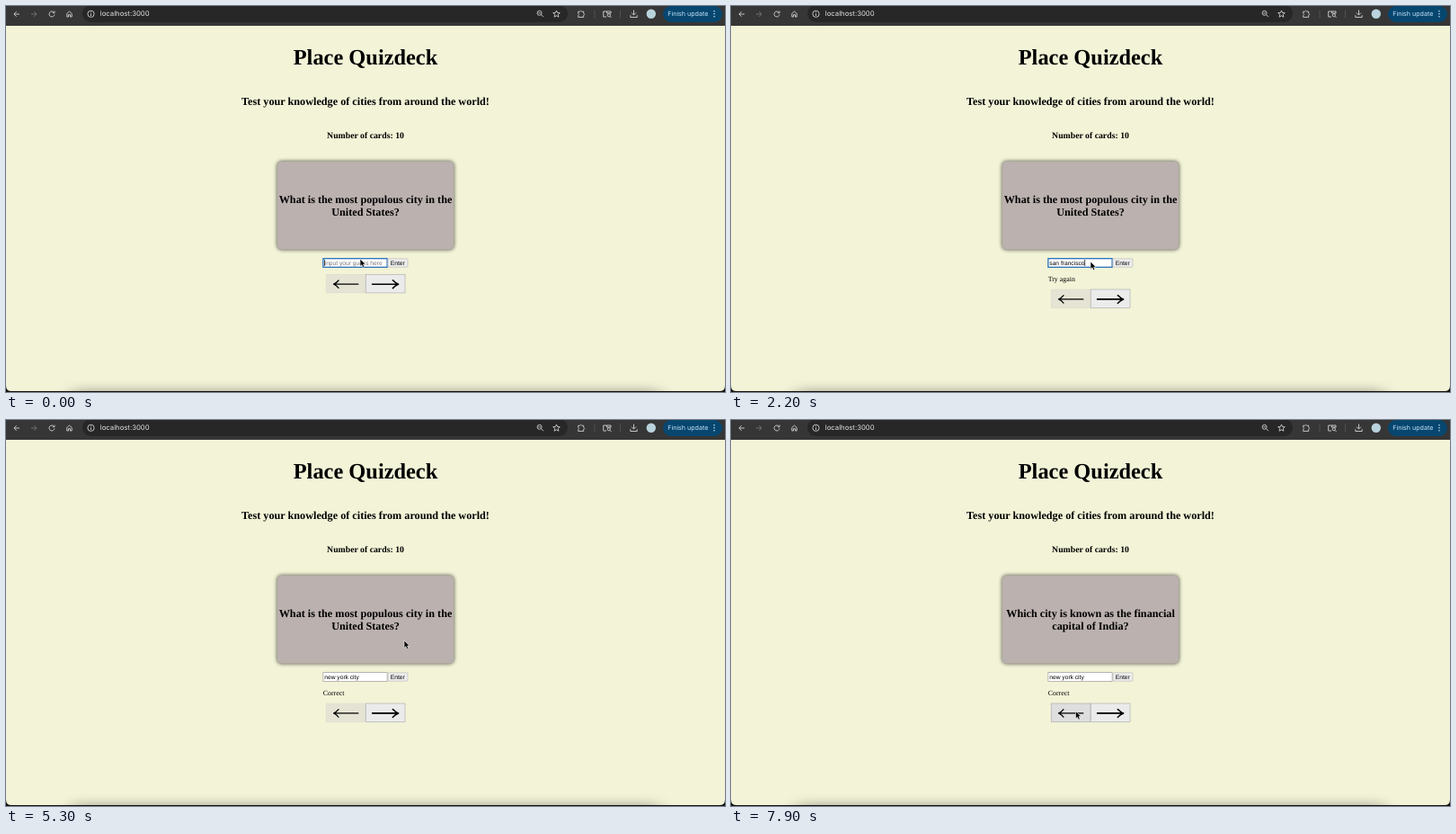
An HTML page that plays this animation: 800 px wide and 429 px high, repeating every 8000 ms.

```html
<!DOCTYPE html>
<html lang="en">
<head>
<meta charset="utf-8">
<title>Quiz</title>
<style>
  html, body { margin: 0; width: 100%; height: 100%; overflow: hidden; background: #111; }
  svg { display: block; width: 800px; height: 429px; }
  text { white-space: pre; text-rendering: geometricPrecision; }
  .ui { font-family: Inter, Roboto, sans-serif; }
  .serif { font-family: "Liberation Serif", Times, serif; }
  .bold { font-weight: 700; text-anchor: middle; }
  .form { font: 6.67px "Liberation Sans", Arial, sans-serif; }
  .icon { fill: none; stroke: #d2d2d2; stroke-width: .9; }
  .arrow { fill: none; stroke: #000; stroke-linecap: round; stroke-linejoin: round; }
</style>
</head>
<body>
<svg viewBox="0 0 800 429">
  <defs>
    <clipPath id="page"><path d="M0 22H800V422Q800 428 794 428H6Q0 428 0 422Z"/></clipPath>
    <filter id="soft" x="-10%" y="-300%" width="120%" height="700%"><feGaussianBlur stdDeviation="10 7"/></filter>
    <filter id="glow" x="-10%" y="-10%" width="120%" height="120%"><feGaussianBlur stdDeviation="2"/></filter>
  </defs>

  <!-- browser bar -->
  <rect width="800" height="22.5" fill="#363636"/>
  <rect x="85" y="-1" width="540" height="19" rx="9.5" fill="#272727"/>
  <g class="icon">
    <path d="M15 9H9M11.7 6.2L8.9 9L11.7 11.8"/>
    <path d="M28 9H34M31.3 6.2L34.1 9L31.3 11.8" stroke="#777"/>
    <path d="M53.5 7.3A3 3 0 1 0 54 9.4M54 5.6V7.7H51.9"/>
    <path d="M67.8 8.4L70.5 6L73.2 8.4V12H71.5V9.7H69.5V12H67.8Z"/>
    <circle cx="94.5" cy="8.8" r="3.6"/>
    <path d="M94.5 8.3V11M94.5 6.5V7.3"/>
    <circle cx="593.6" cy="7.8" r="2.5"/>
    <path d="M595.5 9.7L598 12.2M592.4 7.8H594.8"/>
    <path d="M612.5 5L613.6 7.5L616.3 7.7L614.2 9.5L614.9 12.2L612.5 10.8L610.1 12.2L610.8 9.5L608.7 7.7L611.4 7.5Z"/>
    <path d="M636.7 6.2H638.6Q639.6 4.2 640.7 6.2H642.7V8.2Q644.6 9.2 642.7 10.2V12.4H636.7V10.4Q638.6 9.3 636.7 8.2Z"/>
    <path d="M668 12H664.7V6H673V8.2M668.5 6V8H673"/>
    <circle cx="670.8" cy="10.2" r="1.6"/>
    <path d="M672 11.4L673.6 13"/>
    <path d="M698.5 4.5V9.8M696 7.6L698.5 10.1L701 7.6M694.8 10.2V12.5H702.2V10.2"/>
    <path d="M655 4.5V13M683.5 4.5V13" stroke="#565656"/>
  </g>
  <circle cx="717.8" cy="8.8" r="5.2" fill="#b9d3dc"/>
  <rect x="731" y="0" width="66" height="18" rx="9" fill="#07466f"/>
  <text class="ui" x="104.8" y="11.4" font-size="7.75" fill="#e2e2e2">localhost:3000</text>
  <text class="ui" x="736.3" y="11.3" font-size="7.1" fill="#c8e6fb">Finish update</text>
  <g fill="#c8e6fb"><circle cx="788" cy="5.8" r=".8"/><circle cx="788" cy="8.8" r=".8"/><circle cx="788" cy="11.8" r=".8"/></g>

  <!-- page -->
  <g clip-path="url(#page)">
    <rect y="22" width="800" height="407" fill="#f2f3d7"/>
    <rect x="74" y="429" width="652" height="16" fill="#000" opacity=".4" filter="url(#soft)"/>
  </g>
  <g class="serif bold">
    <text x="400" y="65" font-size="24.4">Place Quizdeck</text>
    <text x="400" y="110.3" font-size="12.2">Test your knowledge of cities from around the world!</text>
    <text x="400" y="147.3" font-size="9.78">Number of cards: 10</text>
  </g>
  <rect x="301.5" y="172.5" width="197" height="98.5" rx="5" opacity=".62" filter="url(#glow)"/>
  <rect x="302" y="173" width="196" height="97.5" rx="5" fill="#bbb1af"/>
  <g class="serif bold" id="card" font-size="12.2"></g>

  <!-- answer form -->
  <rect id="field" x="352.9" y="280.7" width="71.2" height="9.6" fill="#fff"/>
  <text class="form" id="answer" x="354.3" y="287.8"></text>
  <rect id="caret" y="282" width=".7" height="7"/>
  <rect id="enter" x="424.8" y="280.8" width="22.2" height="9.4" rx="1" stroke="#aaa" stroke-width=".5"/>
  <text class="form" x="427.8" y="287.8">Enter</text>
  <text class="serif" id="note" x="352.7" y="305.5" font-size="7.9"></text>

  <g id="nav">
    <rect id="prev" x="356.2" y="298.3" width="43.8" height="20.6" stroke-width=".5"/>
    <rect id="next" x="400.2" y="298.3" width="43.8" height="20.6" stroke-width=".5"/>
    <path class="arrow" stroke-width="1.3" d="M391.8 309.2H364.6M370 305Q367.5 308 364.6 309.2Q367.5 310.4 370 313.4"/>
    <path class="arrow" stroke-width="1.6" d="M407.6 309.2H436.6M430.4 304.8Q433.4 308 436.6 309.2Q433.4 310.4 430.4 313.6"/>
  </g>

  <path id="mouse" d="M0 0V8.4L1.9 6.7L3.2 9.6L4.8 8.9L3.5 6.1H6Z" fill="#000" stroke="#fff" stroke-width=".6"/>
</svg>

<script>
const LOOP = 8000, STEP = 100;
const $ = id => document.getElementById(id);
const set = (id, attrs) => { for (const k in attrs) $(id).setAttribute(k, attrs[k]); };

const CARDS = {
  states: ["What is the most populous city in the", "United States?"],
  canals: ["Which European city is built on", "canals and often called 'The Floating", "City?'"],
  india: ["Which city is known as the financial", "capital of India?"]
};

// [time, value]: each value holds until the next time
const cardSteps = [[0, "states"], [5800, "india"], [6400, "canals"], [7700, "india"]];
const noteSteps = [[0, ""], [1600, "Try again"], [4400, "Correct"]];
const focusSteps = [[0, true], [1500, false], [2100, true], [4400, false]];
const caretSteps = [[0, true], [1200, false], [2100, true], [4400, false]];
const mouseSteps = [[0, true], [200, false], [1100, true], [2600, false], [3700, true]];

// [start, end, text, from, to]: characters shown while typing or erasing
const typing = [
  [100, 1100, "san francisco", 0, 13],
  [2200, 2500, "san francisco", 13, 0],
  [2500, 3000, "new york city", 0, 4],
  [3000, 3700, "new york city", 4, 13]
];

// [time, x, y] of the pointer tip
const path = [
  [0, 394, 281], [1000, 394, 281], [1300, 434, 284], [1700, 434, 284], [2100, 400, 284],
  [3700, 400, 284], [4000, 426, 285], [4200, 434, 285], [4600, 434, 285], [5000, 443, 245],
  [5300, 443, 245], [5700, 434.5, 323.5], [7000, 434.5, 323.5], [7500, 383.5, 323.5], [8000, 383.5, 323.5]
];

const at = (steps, t) => steps.filter(s => s[0] <= t).pop()[1];

function pointer(t) {
  const i = path.findIndex(p => p[0] > t), a = path[i - 1], b = path[i];
  const u = (t - a[0]) / (b[0] - a[0]), e = u * u * (3 - 2 * u);
  return [a[1] + (b[1] - a[1]) * e, a[2] + (b[2] - a[2]) * e];
}

function typed(t) {
  const row = typing.filter(r => r[0] <= t).pop();
  if (!row) return "";
  const [start, end, text, from, to] = row;
  const u = Math.min(1, (t - start) / (end - start));
  return text.slice(0, Math.round(from + (to - from) * u));
}

let shown = "";
function showCard(name) {
  if (name === shown) return;
  shown = name;
  const lines = CARDS[name], top = 226 - (lines.length - 1) * 7;
  $("card").replaceChildren(...lines.map((line, i) => {
    const el = document.createElementNS("http://www.w3.org/2000/svg", "text");
    el.setAttribute("x", 400);
    el.setAttribute("y", top + i * 14 - 0.2);
    el.textContent = line;
    return el;
  }));
}

function navButton(id, disabled, hover) {
  set(id, {
    fill: disabled ? "#e5e4d4" : hover ? "#dedede" : "#ebebeb",
    stroke: disabled ? "#dadacb" : "#9a9a9c"
  });
}

function draw(t) {
  const card = at(cardSteps, t), note = at(noteSteps, t), focus = at(focusSteps, t);
  const [x, y] = pointer(t), visible = at(mouseSteps, t);
  const shift = note ? 16.7 : 0;
  const over = (left, top, w, h) => visible && x > left && x < left + w && y > top && y < top + h;

  showCard(card);
  $("note").textContent = note;

  const text = typed(t), answer = $("answer");
  answer.textContent = text;
  const width = text ? answer.getComputedTextLength() : 0;
  if (!text) answer.textContent = "Input your guess here";
  set("answer", { fill: text ? "#000" : "#757575" });
  set("caret", { x: 354.2 + width, opacity: at(caretSteps, t) ? 1 : 0 });
  set("field", { stroke: focus ? "#1867b8" : "#8a8a8a", "stroke-width": focus ? 1.2 : 0.6 });
  set("enter", { fill: over(427, 280, 20, 10) ? "#d9d9d9" : "#ececec" });

  set("nav", { transform: `translate(0 ${shift})` });
  navButton("prev", card === "states", over(356, 298 + shift, 44, 21));
  navButton("next", card === "canals", over(400, 298 + shift, 44, 21));
  set("mouse", { transform: `translate(${x} ${y})`, opacity: visible ? 1 : 0 });
}

function frame() {
  const t = performance.now() % LOOP;
  draw(Math.floor(t / STEP) * STEP);
  requestAnimationFrame(frame);
}
frame();
</script>
</body>
</html>
```
